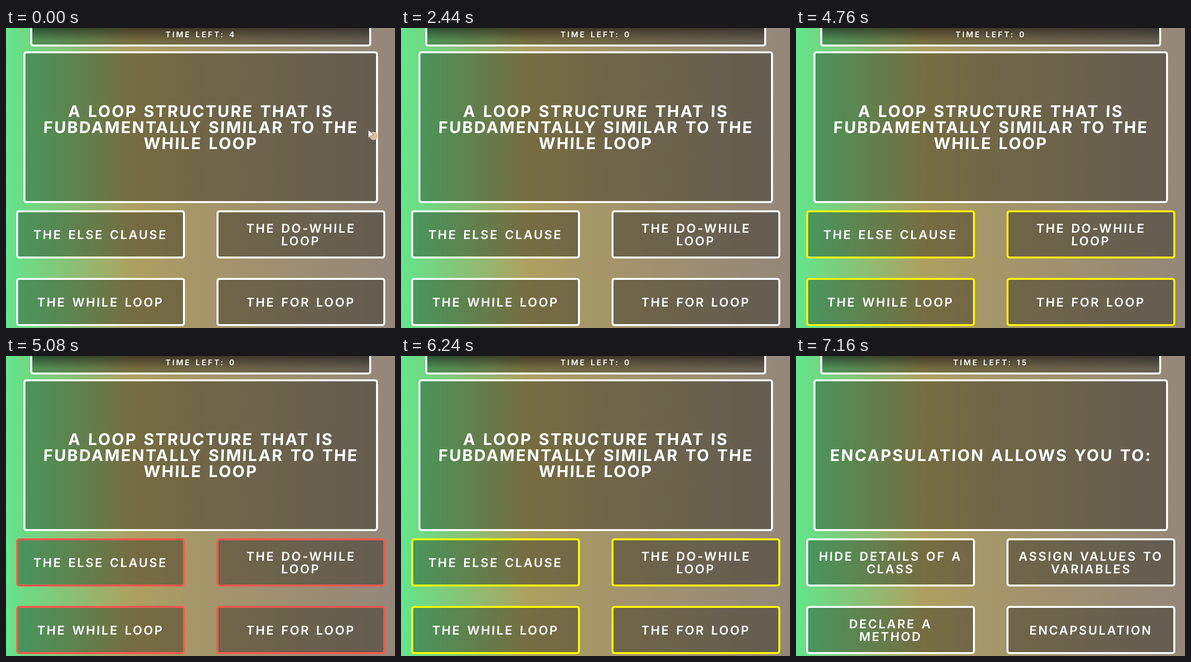
These frames come from a looping animation (800x617 px, 7200 ms). An HTML page:

```html
<!DOCTYPE html>
<html lang="en">
<head>
<meta charset="utf-8">
<title>Quiz</title>
<style>
html, body { margin: 0; width: 100%; height: 100%; overflow: hidden; }
body {
  position: relative;
  background: linear-gradient(90deg, #62e88a 0, #6ade88 22px, #aea060 262px, #a59669 400px, #94877a 800px);
  font-family: Inter, "Open Sans", sans-serif;
  color: #fff;
}
.box {
  position: absolute;
  box-sizing: border-box;
  display: flex;
  flex-direction: column;
  align-items: center;
  justify-content: center;
  border: 4px solid #fff;
  border-radius: 6px;
  background: rgba(0, 0, 0, .32) padding-box;
  white-space: pre;
}
.box span { display: block; transform: skewX(-2deg); }
#timer {
  left: 50px; top: -12px; width: 701px; height: 50px;
  background: linear-gradient(rgba(0, 0, 0, .62) 8px, rgba(0, 0, 0, .32) 34px) padding-box;
  font: 600 16px/20px Inter, sans-serif;
  letter-spacing: 3.3px; word-spacing: 2px;
}
#question {
  left: 36px; top: 48px; width: 729px; height: 312px;
  font: 700 33px/33px Inter, sans-serif;
  letter-spacing: 2.7px; word-spacing: 3px;
}
.answer {
  width: 347px; height: 99px;
  font: 600 25px/26px Inter, sans-serif;
  letter-spacing: 3.1px; word-spacing: 3px;
}
#cursor { position: absolute; left: 742px; top: 206px; }
</style>
</head>
<body>
<div class="box" id="timer"></div>
<div class="box" id="question"></div>
<svg id="cursor" width="24" height="28">
  <circle cx="14" cy="16" r="8.5" fill="#dcc09a"/>
  <path d="M3 4V20L7 16.5 14 13Z" fill="#fff" stroke="#555" stroke-width=".8"/>
</svg>
<script>
const LOOP = 7200, FLASH_START = 4280, NEXT = 7160;
const RED = [255, 71, 87], YELLOW = [255, 255, 0];

const rounds = [
  ["A LOOP STRUCTURE THAT IS\nFUBDAMENTALLY SIMILAR TO THE\nWHILE LOOP",
   "THE ELSE CLAUSE", "THE DO-WHILE\nLOOP", "THE WHILE LOOP", "THE FOR LOOP"],
  ["ENCAPSULATION ALLOWS YOU TO:",
   "HIDE DETAILS OF A\nCLASS", "ASSIGN VALUES TO\nVARIABLES", "DECLARE A\nMETHOD", "ENCAPSULATION"]
];
// [time from which the value shows, seconds left]
const countdown = [[0, 4], [800, 3], [1280, 2], [1520, 1], [2280, 0], [6520, 15]];

const timer = document.getElementById("timer");
const question = document.getElementById("question");
const cursor = document.getElementById("cursor");

const answers = [[21, 375], [433, 375], [21, 514], [433, 514]].map(([x, y]) => {
  const box = document.createElement("div");
  box.className = "box answer";
  box.style.left = x + "px";
  box.style.top = y + "px";
  document.body.append(box);
  return box;
});

function setText(box, text) {
  if (box.text === text) return;
  box.text = text;
  box.replaceChildren(...text.split("\n").map(line => {
    const span = document.createElement("span");
    span.textContent = line;
    return span;
  }));
}

function borderColor(t) {
  if (t < FLASH_START || t >= NEXT) return "#fff";
  const k = .5 + .5 * Math.cos((t - FLASH_START - 34) / 480 * 2 * Math.PI);
  return `rgb(${RED.map((c, i) => Math.round(c + (YELLOW[i] - c) * k))})`;
}

function draw(now) {
  const t = Math.floor(now % LOOP / 40) * 40;
  const [title, ...options] = rounds[t < NEXT ? 0 : 1];
  const left = countdown.filter(([start]) => start <= t).pop()[1];
  setText(timer, "TIME LEFT: " + left);
  setText(question, title);
  answers.forEach((box, i) => {
    setText(box, options[i]);
    box.style.borderColor = borderColor(t);
  });
  cursor.style.display = t < 520 ? "block" : "none";
}

const begin = performance.now();
function tick() {
  draw(performance.now() - begin);
  requestAnimationFrame(tick);
}
tick();
</script>
</body>
</html>
```
